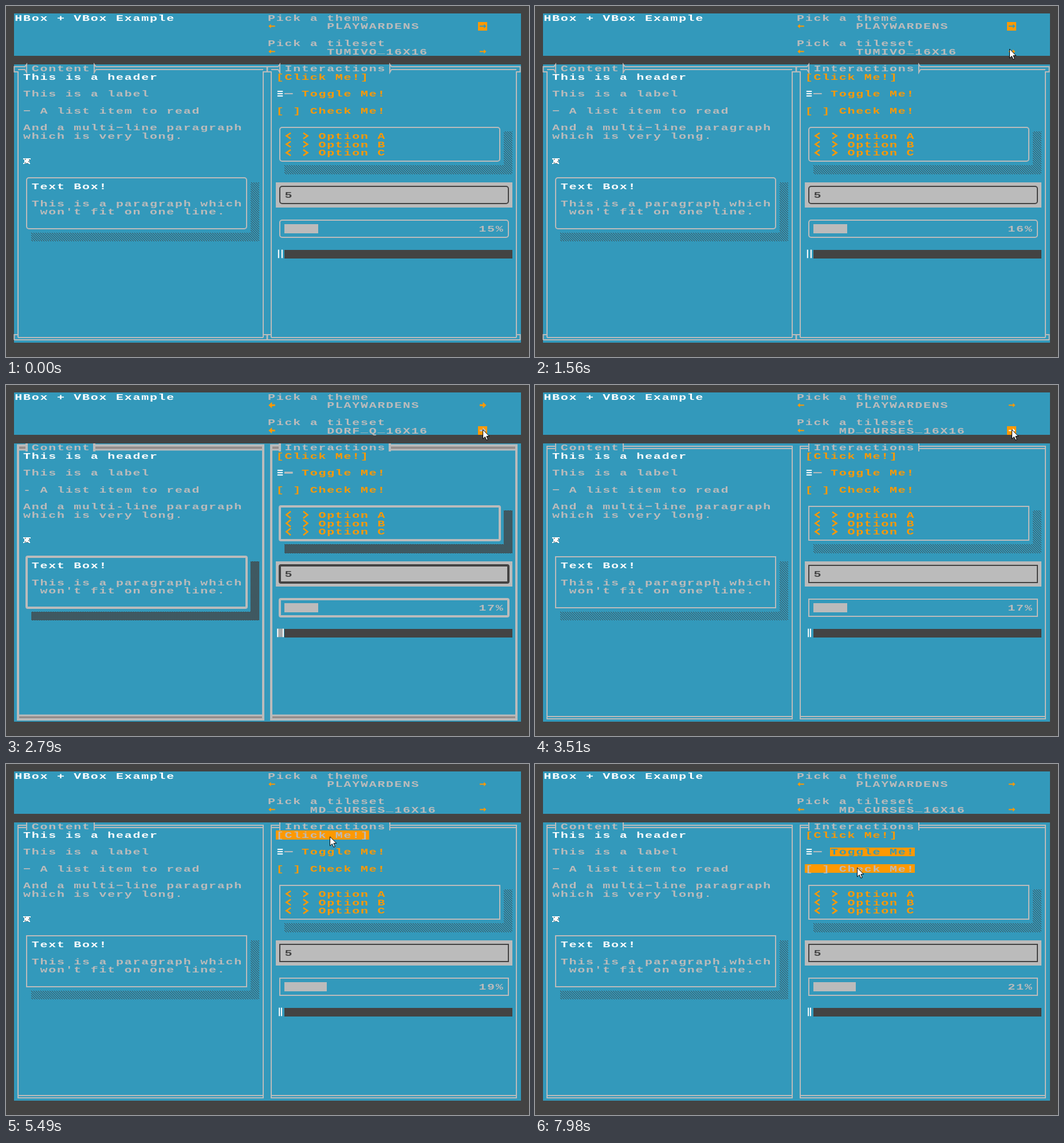
These frames come from a looping animation (913 by 613 pixels, 8 s). An HTML page with a canvas:

```html
<!DOCTYPE html>
<html lang="en">
<head>
<meta charset="utf-8">
<title>HBox + VBox Example</title>
<style>
html, body { margin: 0; width: 100%; height: 100%; overflow: hidden; background: #434343; }
canvas { display: block; }
</style>
</head>
<body>
<canvas id="stage" width="913" height="613"></canvas>
<script>
const ctx = document.getElementById('stage').getContext('2d');
const LOOP = 8000, STEP = 30, CELL = 913 / 62;
const DARK = '#434343', BLUE = '#3399bb', GREY = '#bbbbbb', ORANGE = '#ff9900', WHITE = '#ffffff';
const ORNATE = 0, PLAIN = 1, THICK = 2;
const X = col => col * CELL;
const Y = row => row * CELL - 1.5;

const tilesets = [
  { from: 0, name: 'TUMIVO_16X16', style: ORNATE },
  { from: 2010, name: 'PELNIR_16X16', style: PLAIN },
  { from: 2700, name: 'DORF_Q_16X16', style: THICK },
  { from: 3510, name: 'MD_CURSES_16X16', style: PLAIN },
];
const percentTicks = [720, 2190, 3660, 5100, 6510, 7980];
const toggleTimes = [5910, 6360, 6900, 7200];

// Cursor path: time, x, y
const path = [
  [360, 914, 58], [780, 838, 34], [1170, 838, 34], [1260, 834, 33], [1410, 834, 33],
  [1560, 828, 75], [1680, 829, 81], [1830, 832, 78], [4110, 832, 78], [4500, 565, 125],
  [5460, 565, 125], [5640, 566, 151], [7440, 566, 151], [7650, 562, 181],
];

// Clickable widgets: cells, focus interval, presses
const controls = {
  theme: { col: 56, row: 2, width: 1, focus: [0, 2010], presses: [] },
  tileset: { col: 56, row: 5, width: 1, focus: [2010, 4770], presses: [[2010, 2160], [2700, 2790], [3510, 3630]] },
  click: { col: 32, row: 8, width: 11, focus: [4770, 5910], presses: [[4770, 4890], [5250, 5310]] },
  toggle: { col: 35, row: 10, width: 10, focus: [5910, LOOP], presses: [[5910, 6030], [6360, 6480], [6900, 7020], [7200, 7290]] },
  check: { col: 32, row: 12, width: 13, focus: [LOOP, LOOP], presses: [] },
};

const within = (t, [start, end]) => t >= start && t < end;
const passed = (t, times) => times.filter(time => t >= time).length;

function cursorAt(t) {
  const next = path.findIndex(key => key[0] > t);
  if (next === 0) return [-100, -100];
  if (next < 0) return path[path.length - 1].slice(1);
  const [t0, x0, y0] = path[next - 1], [t1, x1, y1] = path[next];
  const u = (t - t0) / (t1 - t0), k = u * u * (3 - 2 * u);
  return [x0 + (x1 - x0) * k, y0 + (y1 - y0) * k];
}

function shadePattern(isDark) {
  const tile = document.createElement('canvas');
  tile.width = tile.height = 4;
  const g = tile.getContext('2d');
  g.fillStyle = DARK;
  for (let y = 0; y < 4; y++)
    for (let x = 0; x < 4; x++) if (isDark(x, y)) g.fillRect(x, y, 1, 1);
  return ctx.createPattern(tile, 'repeat');
}
const lightShade = shadePattern((x, y) => x === y);
const denseShade = shadePattern((x, y) => (x + 2 * y) % 4 !== 0);

// Cell blocks snap to whole pixels
function cells(col, row, width, height, color) {
  const x = Math.floor(X(col) + 0.2), y = Math.round(Y(row));
  ctx.fillStyle = color;
  ctx.fillRect(x, y, Math.ceil(X(col + width)) - x, Math.ceil(Y(row + height)) - y);
}

function text(str, col, row, color = GREY) {
  ctx.font = 'bold 15.5px "Liberation Mono", monospace';
  ctx.textAlign = 'center';
  ctx.fillStyle = color;
  ctx.save();
  ctx.scale(1.4, 1); // the tiles hold a wide face
  [...str].forEach((ch, i) => {
    const lift = ch === '_' ? 3 : 0;
    ctx.fillText(ch, (X(col + i + 0.5) - 0.3) / 1.4, Y(row) + 12.4 - lift);
  });
  ctx.restore();
}

function line(points, color = GREY, width = 2) {
  ctx.strokeStyle = color;
  ctx.lineWidth = width;
  ctx.beginPath();
  points.forEach(([x, y]) => ctx.lineTo(x, y));
  ctx.stroke();
}

function arrow(col, row, direction, color, style) {
  const head = style === THICK ? 5.5 : 3.7, shaft = style === THICK ? 1.5 : 1;
  const neck = 5.5 - head;
  ctx.save();
  ctx.translate(X(col + 0.5) + 0.4, Y(row + 0.5));
  ctx.scale(direction, 1);
  ctx.beginPath();
  for (const [x, y] of [[-5.5, -shaft], [neck, -shaft], [neck, -head], [6, 0], [neck, head], [neck, shaft], [-5.5, shaft]])
    ctx.lineTo(x, y);
  ctx.fillStyle = color;
  ctx.fill();
  ctx.restore();
}

function box(col0, row0, col1, row1, style, color = GREY) {
  const x = Math.floor(X(col0 + 0.5)), y = Math.floor(Y(row0 + 0.5));
  ctx.strokeStyle = color;
  ctx.lineWidth = style === THICK ? 4 : 2;
  ctx.beginPath();
  ctx.roundRect(x, y, Math.ceil(X(col1 + 0.5)) - x, Math.ceil(Y(row1 + 0.5)) - y, [4, 0, 2][style]);
  ctx.stroke();
}

function shadow(col0, row0, col1, row1, style) {
  const shade = style === THICK ? denseShade : lightShade;
  cells(col1, row0, 1, row1 - row0, shade);
  cells(col0, row1, col1 - col0 + 1, 1, shade);
}

function panel(col, title, style) {
  const left = Math.round(X(col + 0.5) - 0.8), right = Math.round(X(col + 29.5) - 0.3);
  const gapL = Math.round(X(col + 1.5) - 0.6), gapR = Math.round(X(col + 2.5 + title.length) - 0.4);
  if (style === ORNATE) {
    for (const [edge, gap, out] of [[left, gapL, -1], [right, gapR, 1]]) {
      const far = edge + out * 6.6;
      line([[edge, 579], [edge, 115], [far, 115], [far, 106], [gap + out * 3, 106],
        [gap, 102], [gap, 116], [gap + out * 3, 111], [edge, 111]]);
      line([[edge, 574], [far, 574], [far, 583]]);
    }
    line([[left - 7, 583], [right + 7, 583]]);
    line([[left, 579], [right, 579]]);
  } else {
    const thick = style === THICK, width = thick ? 4 : 2, innerWidth = thick ? 3 : 2;
    const [top, innerTop, innerBottom, bottom] = thick ? [105.5, 113, 577, 584] : [107, 111, 579, 583];
    if (thick) {
      ctx.fillStyle = '#948c8a';
      ctx.fillRect(left, top, gapL - left, 7);
      ctx.fillRect(gapR, top, right - gapR, 7);
      ctx.fillRect(left, innerBottom, right - left, 7);
    }
    line([[gapL, top], [left, top], [left, bottom], [right, bottom], [right, top], [gapR, top]], GREY, width);
    for (const [edge, gap] of [[left, gapL], [right, gapR]]) {
      line([[edge, innerTop], [gap, innerTop]], GREY, innerWidth);
      line([[gap, 102], [gap, 116]], GREY, width);
    }
    line([[left, innerBottom], [right, innerBottom]], GREY, innerWidth);
  }
  text(title, col + 2, 7);
}

function control({ col, row, width, focus, presses }, t, [cx, cy], paint) {
  const hovered = cx >= X(col) && cx < X(col + width) && cy >= Y(row) && cy < Y(row + 1);
  const pressed = presses.some(span => within(t, span));
  const focused = within(t, focus);
  if (pressed || hovered || focused) cells(col, row, width, 1, ORANGE);
  paint(pressed ? WHITE : hovered ? GREY : focused ? BLUE : ORANGE, col, row);
}

function button(target, label, t, pointer) {
  control(target, t, pointer, (color, col, row) => text(label, col, row, color));
}

function picker(title, value, row, target, t, style, pointer) {
  text(title, 31, row);
  arrow(31, row + 1, -1, ORANGE, style);
  text(value, 32 + Math.floor((24 - value.length) / 2), row + 1);
  control(target, t, pointer, (color, col, r) => arrow(col, r, 1, color, style));
}

function toggleSwitch(on, style) {
  const knob = X(on ? 33 : 32), rail = X(on ? 32 : 33), mid = Y(10.5);
  for (const dy of [-4, 0, 4])
    line([[knob + 2.6, mid + dy], [knob + 12, mid + dy]], on ? ORANGE : WHITE);
  line([[rail, mid], [rail + CELL, mid]], GREY, style === THICK ? 3.4 : 2);
}

function radio(label, row, style) {
  const mid = Y(row + 0.5), reach = style === THICK ? 6 : 5;
  for (const [tip, back] of [[489.5, 497], [526.5, 519]])
    line([[back, mid - reach], [tip, mid], [back, mid + reach]], ORANGE, 2.6);
  text(label, 37, row, ORANGE);
}

function critter() {
  ctx.fillStyle = WHITE;
  ctx.fillRect(32, 266, 9, 9);
  for (const [x, y] of [[30, 266], [41, 266], [30, 274], [40, 274]]) ctx.fillRect(x, y, 2, 2);
  ctx.fillStyle = DARK;
  for (const [x, y] of [[33, 267], [40, 268], [39, 271], [33, 273], [36, 274]]) ctx.fillRect(x, y, 1.5, 1.5);
}

function leftPanel(style) {
  const dash = style === THICK ? '-' : '−';
  panel(1, 'Content', style);
  text('This is a header', 2, 8, WHITE);
  text('This is a label', 2, 10);
  text(dash + ' A list item to read', 2, 12);
  text(`And a multi${dash}line paragraph`, 2, 14);
  text('which is very long.', 2, 15);
  critter();
  shadow(3, 21, 29, 27, style);
  box(2, 20, 28, 26, style);
  text('Text Box!', 3, 21, WHITE);
  text('This is a paragraph which', 3, 23);
  text("won't fit on one line.", 4, 24);
}

function rightPanel(t, style, pointer) {
  panel(31, 'Interactions', style);
  button(controls.click, '[Click Me!]', t, pointer);
  toggleSwitch(passed(t, toggleTimes) % 2 === 1, style);
  button(controls.toggle, 'Toggle Me!', t, pointer);
  button(controls.check, '[ ] Check Me!', t, pointer);

  shadow(33, 15, 59, 19, style);
  box(32, 14, 58, 18, style);
  ['A', 'B', 'C'].forEach((name, i) => radio('Option ' + name, 15 + i, style));

  cells(32, 21, 28, 3, GREY);
  box(32, 21, 59, 23, style, DARK);
  text('5', 33, 22, DARK);

  const percent = 15 + passed(t, percentTicks);
  box(32, 25, 59, 27, style);
  cells(33, 26, Math.round(26 * percent / 100), 1, GREY);
  text(percent + '%', 56, 26);

  cells(33, 29, 27, 1, DARK);
  const inset = [4.6, 6, 3][style];
  if (style === THICK) {
    ctx.fillStyle = '#a5a9aa';
    ctx.fillRect(X(32) + 3, Y(29), 10, CELL);
  }
  for (const x of [X(32) + inset, X(33) - inset + (style === ORNATE ? 0.6 : 1)])
    line([[x, Y(29)], [x, Y(30)]], WHITE);
}

function drawCursor([x, y]) {
  ctx.beginPath();
  for (const [dx, dy] of [[0, 0], [0, 16], [3.8, 12.5], [6.3, 18.3], [8.8, 17.3], [6.4, 11.6], [11.3, 11.6]])
    ctx.lineTo(x + dx + 0.5, y + dy);
  ctx.closePath();
  ctx.fillStyle = WHITE;
  ctx.fill();
  ctx.strokeStyle = '#000';
  ctx.lineWidth = 1;
  ctx.stroke();
}

function draw(now) {
  const t = Math.floor(now % LOOP / STEP) * STEP;
  const { name, style } = tilesets[passed(t, tilesets.map(set => set.from)) - 1];
  const pointer = cursorAt(t - STEP); // hover trails the cursor by one step
  ctx.fillStyle = DARK;
  ctx.fillRect(0, 0, 913, 613);
  cells(1, 1, 60, 5, BLUE);
  cells(1, 7, 60, 33, BLUE);
  text('HBox + VBox Example', 1, 1, WHITE);
  picker('Pick a theme', 'PLAYWARDENS', 1, controls.theme, t, style, pointer);
  picker('Pick a tileset', name, 4, controls.tileset, t, style, pointer);
  leftPanel(style);
  rightPanel(t, style, pointer);
  drawCursor(cursorAt(t));
}

const start = performance.now();
function tick() {
  draw(performance.now() - start);
  requestAnimationFrame(tick);
}
tick();
</script>
</body>
</html>
```
